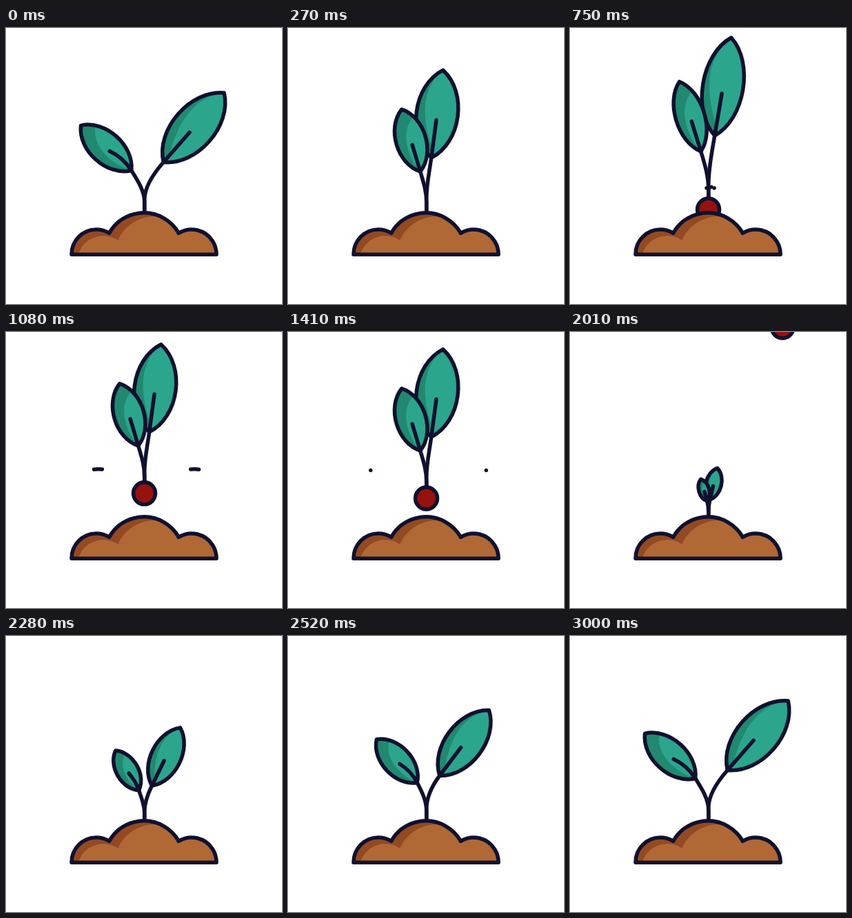
An HTML page with a canvas for the animation above (5630 ms loop, 400x400 px).

```html
<!DOCTYPE html>
<html lang="en">
<head>
<meta charset="utf-8">
<title>Sprout</title>
<style>
  html, body { margin: 0; width: 100%; height: 100%; overflow: hidden; background: #fff; }
  canvas { display: block; width: 400px; height: 400px; }
</style>
</head>
<body>
<canvas id="stage"></canvas>
<script>
const LOOP = 5630, STEP = 30;
const INK = '#10112f', LEAF = '#2ca58d', LEAF_DARK = '#20896f';
const SOIL = '#b06835', SOIL_DARK = '#944a20', RED = '#96120e';
const FOOT = { x: 200.7, y: 268 };

const canvas = document.getElementById('stage');
const scale = window.devicePixelRatio || 1;
canvas.width = canvas.height = 400 * scale;
const ctx = canvas.getContext('2d');

// Each pose: right leaf, then left leaf, as base x, base y, length, angle, bulge.
const open    = [27.5, -73.5, 133.5, 41.2, 40,  -19, -61.5, 98, -48.3, 30];
const closed  = [7, -80, 128, 7.6, 40,    -9, -60, 94, -16.7, 29];
const stretch = [9, -98, 144, 9.6, 39,    -11, -75, 106, -17.1, 28];
const seed    = [0, -2, 2, 12, 1,         0, -2, 2, -14, 1];
const sprout  = [2, -25, 47, 13.4, 15,    -2, -23, 33, -15.7, 10];
const young   = [19, -65.5, 119, 37, 36,  -13.5, -55.5, 86, -43.1, 27];
const halfway = closed.map((v, i) => (v + stretch[i]) / 2);

// Rows: time, lift, radish height, pose.
const pull = [
  [0, 0, 300, ...open],
  [270, 0, 300, ...closed],
  [570, -5, 285, ...halfway],
  [750, -14, 263, ...stretch],
  [960, -38, 239, ...closed],
  [1140, -44, 233, ...closed],
  [1410, -36, 241, ...closed],
  [1710, -36, 241, ...closed]
];
const grow = [
  [1830, ...seed],
  [2010, ...sprout],
  [2520, ...young],
  [3000, ...open]
];

const clamp = v => Math.max(0, Math.min(1, v));
const progress = (t, from, to) => clamp((t - from) / (to - from));
const easeOut = p => 1 - (1 - p) ** 2;

// Smooth interpolation through the rows without overshoot.
function sample(rows, t) {
  const last = rows.length - 1;
  if (t <= rows[0][0]) return rows[0].slice(1);
  if (t >= rows[last][0]) return rows[last].slice(1);
  const i = rows.findIndex(row => row[0] > t) - 1;
  const slope = (j, k) => (rows[j + 1][k] - rows[j][k]) / (rows[j + 1][0] - rows[j][0]);
  const tangent = (j, k) => {
    if (j === 0 || j === last) return 0;
    const a = slope(j - 1, k), b = slope(j, k);
    return a * b > 0 ? 2 * a * b / (a + b) : 0;
  };
  const span = rows[i + 1][0] - rows[i][0], p = (t - rows[i][0]) / span;
  return rows[i].map((v, k) => {
    const w = p * p * (3 - 2 * p);
    return v + (rows[i + 1][k] - v) * w
      + span * p * (1 - p) * ((1 - p) * tangent(i, k) - p * tangent(i + 1, k));
  }).slice(1);
}

function ink(path) {
  ctx.strokeStyle = INK;
  ctx.lineWidth = 5.5;
  ctx.lineCap = ctx.lineJoin = 'round';
  ctx.stroke(path);
}

function shaded(outline, light, darkColor, lightColor) {
  ctx.save();
  ctx.clip(outline);
  ctx.fillStyle = darkColor;
  ctx.fill(outline);
  ctx.fillStyle = lightColor;
  ctx.fill(light);
  ctx.restore();
  ink(outline);
}

function drawLeaf([x, y, len, angle, bulge], isLeft) {
  const a = len * 0.215, rad = angle * Math.PI / 180;
  const outline = new Path2D();
  outline.moveTo(0, 0);
  outline.bezierCurveTo(-bulge, -a, -bulge, a - len, 0, -len);
  outline.bezierCurveTo(bulge, a - len, bulge, -a, 0, 0);
  outline.closePath();

  const [startX, lowX, highX, endX, endY] = isLeft
    ? [0, -0.13, -0.13, 0.15, -0.84]
    : [0.05, -0.1, -0.28, 0, -1];
  const light = new Path2D();
  light.moveTo(startX * len, 0);
  light.bezierCurveTo(lowX * len, -0.27 * len, highX * len, -0.69 * len, endX * len, endY * len);
  light.lineTo(len, endY * len);
  light.lineTo(len, 0);

  ctx.save();
  ctx.translate(x, y);
  ctx.rotate(rad);
  shaded(outline, light, LEAF_DARK, LEAF);
  const vein = new Path2D();
  const bend = isLeft ? Math.max(0, -angle - 17) * 0.2 : 0;
  vein.moveTo(0, 0);
  vein.quadraticCurveTo(bend, -0.22 * len, 0, -0.43 * len);
  ink(vein);
  ctx.restore();

  // The stem runs straight up to the fork, then bends into the vein.
  const fork = 0.26 * y, back = -0.27 * y;
  const heading = rad + Math.atan2(bend, 0.22 * len);
  const stem = new Path2D();
  stem.moveTo(0, 0);
  stem.lineTo(0, fork);
  stem.bezierCurveTo(0, 0.52 * y, x - Math.sin(heading) * back, y + Math.cos(heading) * back, x, y);
  ink(stem);
}

function drawPlant(pose, lift) {
  ctx.save();
  ctx.translate(FOOT.x, FOOT.y + lift);
  drawLeaf(pose.slice(0, 5), false);
  drawLeaf(pose.slice(5), true);
  ctx.restore();
}

function drawRadish(y) {
  const ball = new Path2D();
  ball.arc(200.5, y, 16, 0, 7);
  ctx.fillStyle = RED;
  ctx.fill(ball);
  ink(ball);
}

function drawPulledPlant(t) {
  const [lift, radishY, ...pose] = sample(pull, t);
  const p = Math.max(0, (t - 1710) / 300), s = p ** 1.8;
  ctx.save();
  ctx.translate(200.5 + 107.5 * s, radishY - 248 * s);
  ctx.rotate(Math.min(p, 1) * Math.PI / 4);
  ctx.translate(-200.5, -radishY);
  drawPlant(pose, lift);
  drawRadish(radishY);
  ctx.restore();
}

// Short strokes that fly outwards as the root comes loose.
function drawBurst(t) {
  if (t < 750 || t > 1500) return;
  const head = easeOut(progress(t, 750, 1230)), tail = easeOut(progress(t, 750, 1410));
  for (const side of [-1, 1]) {
    const ray = new Path2D();
    for (let i = 0; i <= 8; i++) {
      const u = tail + (head - tail) * i / 8;
      const x = 203.5 + side * (5.5 + 78.2 * u + i * 0.001);
      ray.lineTo(x, 232 - 31.5 * u - 50 * u * (1 - u));
    }
    ink(ray);
  }
  if (t < 960) {
    const dot = new Path2D(), y = 230.5 - 80 * progress(t, 750, 960);
    dot.moveTo(205, y);
    dot.lineTo(205.01, y);
    ink(dot);
  }
}

function drawMound() {
  const ground = 328.3;
  const outline = new Path2D();
  outline.moveTo(95, ground);
  outline.arc(131, 328, 36, Math.PI, -1.02);
  outline.arc(200, 326, 58, -2.617, -0.525);
  outline.arc(269, 328, 36, -2.12, 0);
  outline.lineTo(305, ground);
  outline.closePath();

  const light = new Path2D();
  light.arc(141, 339, 38, 0, 7);
  light.closePath();
  light.moveTo(272.5, 330.5);
  light.arc(215, 330.5, 57.5, 0, 7);
  light.closePath();
  light.rect(225, 260, 100, 80);
  shaded(outline, light, SOIL_DARK, SOIL);
}

function draw(t) {
  ctx.setTransform(scale, 0, 0, scale, 0, 0);
  ctx.fillStyle = '#fff';
  ctx.fillRect(0, 0, 400, 400);
  drawBurst(t);
  if (t > 1830) drawPlant(sample(grow, t), 0);
  if (t < 2200) drawPulledPlant(t);
  drawMound();
}

const start = performance.now();
function tick() {
  const t = (performance.now() - start) % LOOP;
  draw(Math.min(3000, Math.floor(t / STEP) * STEP));
  requestAnimationFrame(tick);
}
tick();
</script>
</body>
</html>
```
